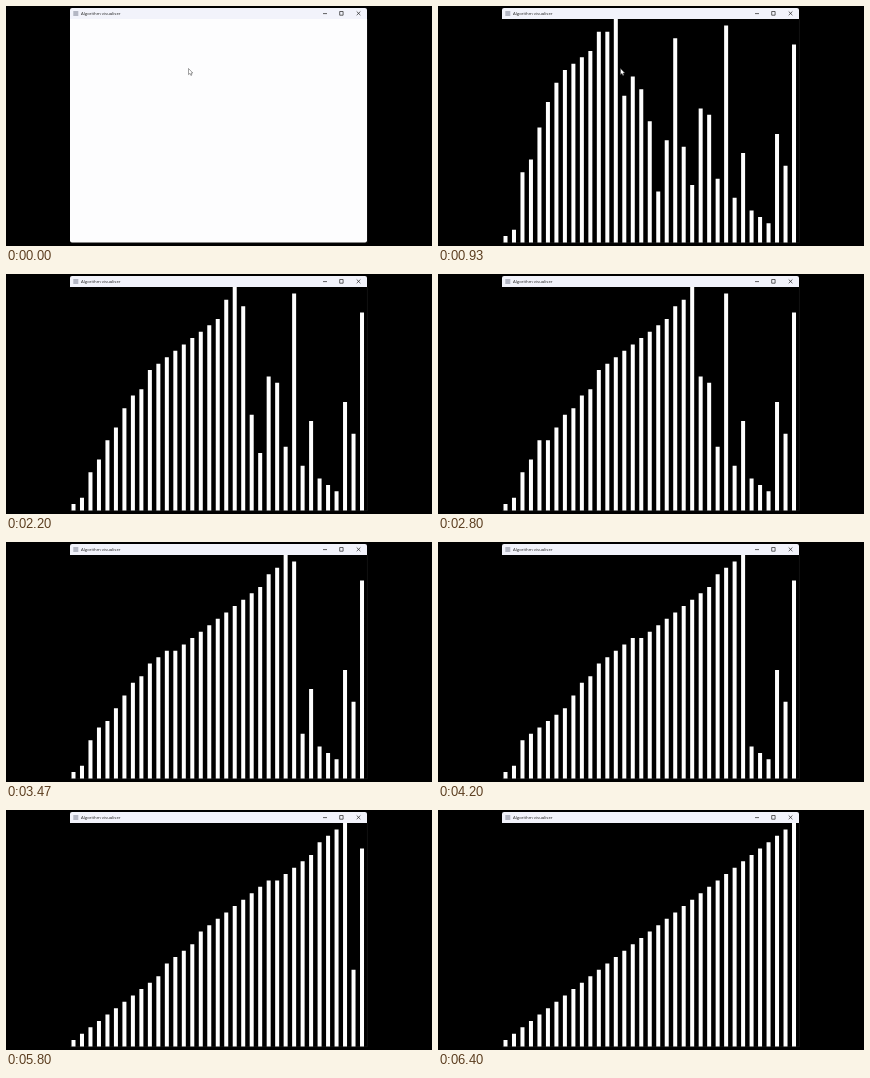
These frames come from a looping animation (426 px wide and 240 px high, 6470 ms). An HTML page:

```html
<!DOCTYPE html>
<html lang="en">
<head>
<meta charset="utf-8">
<title>Insertion sort</title>
<style>
  html, body { margin: 0; width: 100%; height: 100%; overflow: hidden; background: #000; }
  svg { display: block; width: 100vw; height: 100vh; }
  text { font: 4.3px "Open Sans", "Noto Sans", sans-serif; fill: #222; }
</style>
</head>
<body>
<svg viewBox="0 0 426 240">
  <path d="M361.4 13V236.7H64" fill="none" stroke="#222" stroke-width=".5"/>
  <path id="blank" d="M64 13H361V234.5a2 2 0 0 1-2 2H66a2 2 0 0 1-2-2Z" fill="#fdfdfe"/>
  <path id="bars" fill="#fefefe"/>
  <path d="M64 13V4a2 2 0 0 1 2-2H359a2 2 0 0 1 2 2V13Z" fill="#f2f3fb"/>
  <rect x="67.3" y="5" width="5" height="5" fill="#b4b7c4"/>
  <text x="75" y="9.2">Algorithm visualiser</text>
  <path d="M317 7.6h4M333.7 5.5h3.4v3.7h-3.4ZM350.7 5.5l3.7 3.7M354.4 5.5l-3.7 3.7" fill="none" stroke="#222" stroke-width=".7"/>
  <path id="cursor" d="M0 0V6.1L1.4 4.9 2.4 7 3.4 6.5 2.5 4.5H4.3Z" fill="#fff" stroke="#444" stroke-width=".5"/>
</svg>
<script>
const LOOP = 6470, FRAME = 1000 / 15, LAST = 96;
const BOTTOM = 236.5, UNIT = 223.5 / 35, SLOT = 297 / 35;
const start = [13, 27, 22, 35, 2, 1, 30, 18, 29, 11, 33, 28, 25, 6, 23, 26, 24, 19,
  8, 16, 32, 15, 9, 21, 20, 10, 34, 7, 14, 5, 4, 3, 17, 12, 31];

// Frame -> number of sorting steps done
const pace = [[0, 0], [14, 62], [24, 106], [42, 184], [63, 279], [78, 347], [LAST, 425]];
// Frame -> pointer position
const pathX = [[0, 182.5], [19, 182.5], [24, 191], [32, 200]];
const pathY = [[0, 62.5], [19, 62.5], [24, 47.5], [32, 14]];

const $ = id => document.getElementById(id);

function insertionStates(values) {
  const a = [...values], states = [values];
  const save = () => states.push([...a]);
  for (let i = 1; i < a.length; i++) {
    const key = a[i];
    let j = i;
    save();
    while (j > 0 && a[j - 1] > key) {
      a[j] = a[--j];
      save();
    }
    a[j] = key;
    save();
  }
  return states;
}

function lerp(points, x) {
  const k = points.findIndex(p => p[0] >= x);
  if (k < 0) return points[points.length - 1][1];
  if (k === 0) return points[0][1];
  const [x0, y0] = points[k - 1], [x1, y1] = points[k];
  return y0 + (y1 - y0) * (x - x0) / (x1 - x0);
}

const states = insertionStates(start);
const barPath = (v, i) =>
  `M${65.5 + i * SLOT} ${BOTTOM}v${-v * UNIT}h4V${BOTTOM}Z`;

function draw(now) {
  const frame = Math.min(LAST, Math.floor((now % LOOP + 5) / FRAME));
  const step = Math.min(states.length - 1, Math.round(lerp(pace, frame)));
  $("blank").style.display = frame ? "none" : "";
  $("bars").setAttribute("d", frame ? states[step].map(barPath).join("") : "");
  $("cursor").style.display = frame > 31 ? "none" : "";
  $("cursor").setAttribute("transform", `translate(${lerp(pathX, frame)} ${lerp(pathY, frame)})`);
}

const origin = performance.now();
function tick() {
  draw(performance.now() - origin);
  requestAnimationFrame(tick);
}
tick();
</script>
</body>
</html>
```
